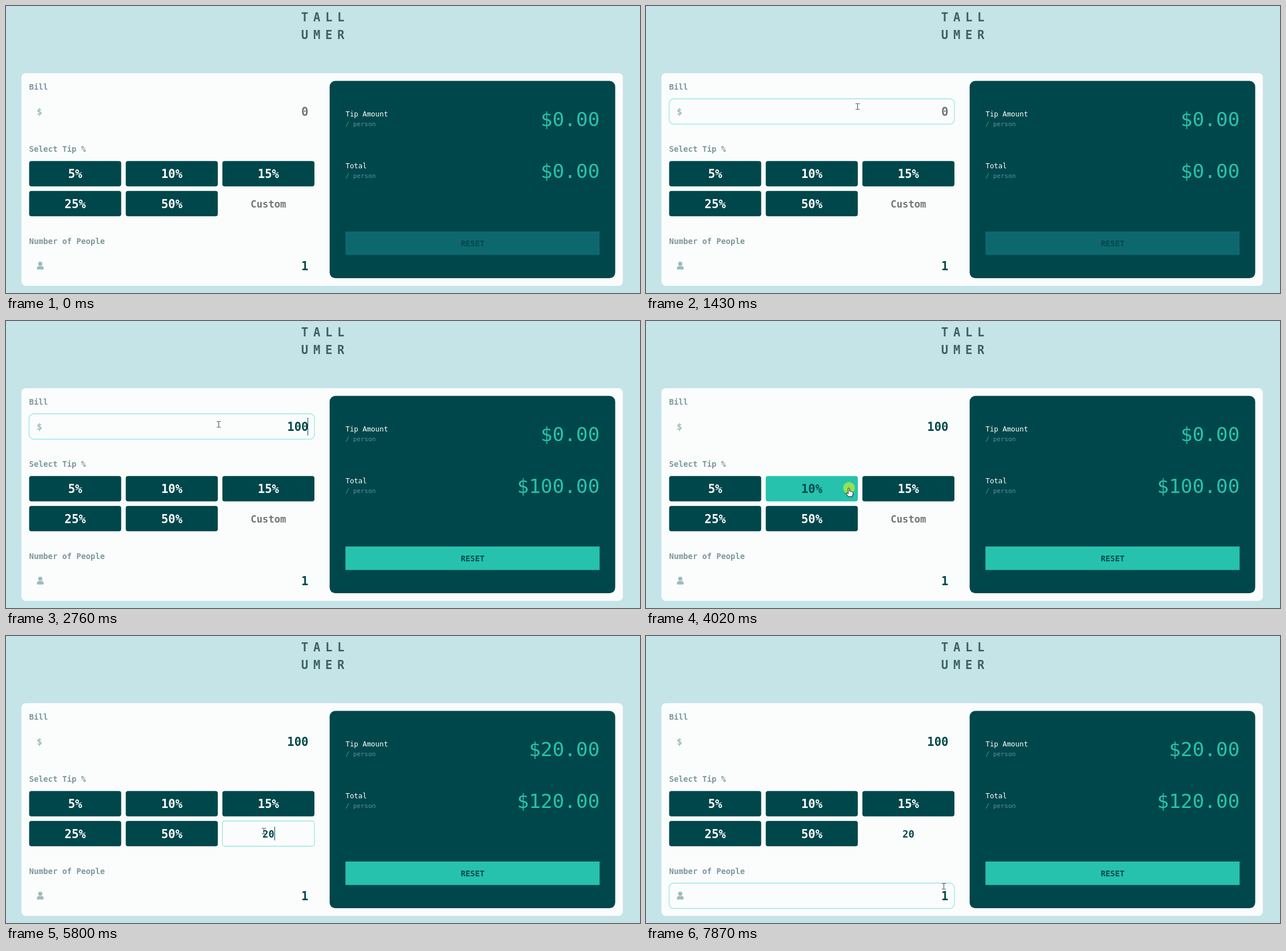
An HTML page with a canvas for the animation above (8 s loop, 1110 px wide and 504 px high).

```html
<!DOCTYPE html>
<html lang="en">
<head>
<meta charset="utf-8">
<title>Tip calculator</title>
<style>
html, body { margin: 0; width: 100%; height: 100%; overflow: hidden; background: #c5e4e7; }
canvas { display: block; width: 1110px; height: 504px; }
</style>
</head>
<body>
<canvas id="stage" width="1110" height="504"></canvas>
<script>
const ctx = document.getElementById('stage').getContext('2d');
const LOOP = 8000, STEP = 65;
const MONO = '"DejaVu Sans Mono", "Liberation Mono", monospace';
const DARK = '#00474b', TEAL = '#26c2ad', PAPER = '#fbfdfd',
      LABEL = '#7c9799', ICON = '#9dbbbd', HINT = '#737577', RING = '#9fe8df';

// Two equal columns; the left one holds a grid three cells wide
const PAD = 13.5, LEFT = 27 + PAD, COL = 499.5, GAP = 8, ROW = 44.5;
const CELL = (COL - 2 * GAP) / 3;
const cell = i => ({
  x: LEFT + (i % 3) * (CELL + GAP),
  y: 272.2 + Math.floor(i / 3) * (ROW + GAP),
  w: CELL, h: ROW, r: 4
});
const field = y => ({ x: LEFT, y, w: COL, h: ROW, r: 8 });
const BILL = field(163), PEOPLE = field(434), CUSTOM = cell(5);
const BUTTONS = ['5%', '10%', '15%', '25%', '50%'].map((label, i) => ({ label, ...cell(i) }));
const TEN = BUTTONS[1];

// Each move follows a cubic curve and ends with a press on its target
const MOVES = [
  { from: 520, to: 1500, curve: [[1091, 42], [760, 170], [341, 58], [372, 181]], target: BILL },
  { from: 3355, to: 3950, curve: [[372, 181], [410, 215], [395, 265], [355.5, 293]], target: TEN },
  { from: 4215, to: 4810, curve: [[355.5, 293], [385, 335], [415, 320], [451.5, 341.5]], target: CUSTOM },
  { from: 6085, to: 6870, curve: [[451.5, 341.5], [480, 360], [490, 410], [521.5, 438.5]], target: PEOPLE }
];
const PRESS_DELAY = 60, PRESS_TIME = 140;
const BLINK = 500;

const clamp = (v, lo, hi) => Math.min(hi, Math.max(lo, v));
const ease = u => u * u * (3 - 2 * u);
const inside = (p, b) => p.x >= b.x && p.x <= b.x + b.w && p.y >= b.y && p.y <= b.y + b.h;
const money = v => '$' + v.toFixed(2);

function text(str, x, y, size, color, align = 'left', weight = 'bold') {
  ctx.font = `${weight} ${size}px ${MONO}`;
  ctx.textAlign = align;
  ctx.fillStyle = color;
  ctx.fillText(str, x, y);
}

function box({ x, y, w, h, r }, fill, stroke) {
  ctx.beginPath();
  ctx.roundRect(x, y, w, h, r);
  if (fill) { ctx.fillStyle = fill; ctx.fill(); }
  if (stroke) { ctx.strokeStyle = stroke; ctx.lineWidth = 1.4; ctx.stroke(); }
}

function disc(x, y, r, color) {
  ctx.beginPath();
  ctx.arc(x, y, r, 0, Math.PI * 2);
  ctx.fillStyle = color;
  ctx.fill();
}

function pointerAt(t) {
  const move = MOVES.findLast(m => t >= m.from);
  if (!move) return null;
  const { from, to, curve: [a, b, c, d] } = move;
  const q = Math.floor((t - from) / STEP) * STEP;
  const u = ease(clamp(q / (to - from), 0, 1)), v = 1 - u;
  const at = k => v ** 3 * a[k] + 3 * v * v * u * b[k] + 3 * v * u * u * c[k] + u ** 3 * d[k];
  return { x: at(0), y: at(1) };
}

function typed(str, t, start, gap) {
  const n = clamp(Math.floor((t - start) / gap) + 1, 0, str.length);
  return { value: str.slice(0, n), last: n ? start + gap * (n - 1) : 0 };
}

function stateAt(t) {
  const bill = typed('100', t, 2230, 265);
  const custom = typed('20', t, 5475, 325);
  const move = MOVES.findLast(m => t >= m.to + PRESS_DELAY);
  const pressed = move ? move.to + PRESS_DELAY : 0;
  const pressing = move && t < pressed + PRESS_TIME;
  const chosen = move && !custom.value && (move.target === TEN || move.target === CUSTOM);
  const rate = custom.value || (chosen && !(move.target === TEN && pressing) ? 10 : 0);
  const tip = bill.value * rate / 100;
  const idle = t - Math.max(pressed, bill.last, custom.last);
  return {
    bill: bill.value, custom: custom.value, tip, total: +bill.value + tip,
    focus: move && move.target, caret: idle % (2 * BLINK) < BLINK, pressing,
    tenLevel: chosen ? 1 : custom.value ? clamp(1 - (t - 5475) / 130, 0, 1) : 0
  };
}

function blend(k) {
  const mix = (a, b) => Math.round(a + (b - a) * k);
  return `rgb(${mix(0, 38)},${mix(71, 194)},${mix(75, 173)})`;
}

function person() {
  disc(60, 452.6, 3.7, ICON);
  ctx.beginPath();
  ctx.roundRect(54.2, 456.8, 11.6, 6, [3.5, 3.5, 1.3, 1.3]);
  ctx.fill();
}

function outline(x, y, d) {
  ctx.save();
  ctx.translate(x, y);
  const p = new Path2D(d);
  ctx.fillStyle = '#fff';
  ctx.strokeStyle = '#111';
  ctx.lineWidth = 1;
  ctx.lineJoin = 'round';
  ctx.fill(p);
  ctx.stroke(p);
  ctx.restore();
}

function beam(p) {
  const x = Math.round(p.x - 0.5), y = Math.round(p.y);
  ctx.fillStyle = '#3b4245';
  ctx.fillRect(x, y - 5, 1, 11);
  for (const dy of [-5, 5]) {
    ctx.fillRect(x - 3, y + dy, 2.5, 1);
    ctx.fillRect(x + 1.5, y + dy, 2.5, 1);
  }
}

function pointer(p) {
  if ([BILL, PEOPLE, CUSTOM].some(b => inside(p, b))) beam(p);
  else if (BUTTONS.some(b => inside(p, b)))
    outline(p.x, p.y, 'M-1.5 1Q0 -1 1 1V6Q2.5 5 3.3 6.5Q5 6 5.4 7.3Q7 7 7 8.6V11L5.5 15.5H-1.5L-5 10.2Q-5 8.5 -3.3 9L-1.5 10.5Z');
  else outline(p.x + 0.5, p.y + 0.5, 'M0 0V11.2L2.6 8.9L4.4 12.8L6.2 12L4.5 8.2H8Z');
}

function caret(s) {
  ctx.fillStyle = DARK;
  if (s.focus === BILL) ctx.fillRect(528, 170, 1, 31);
  if (s.focus === PEOPLE) ctx.fillRect(516, 441, 1, 31);
  if (s.focus === CUSTOM) ctx.fillRect(460 + Math.round(s.custom.length * 5.2), 335, 1, 24);
}

function result(name, amount, y) {
  text(name, 594.5, y - 17, 12.35, '#fff', 'left', 'normal');
  text('/ person', 594.5, y, 11, '#5b9195', 'left', 'normal');
  text(money(amount), 1039.3, y, 34.3, TEAL, 'right', 'normal');
}

function draw(t) {
  const s = stateAt(t), p = pointerAt(t);
  const hover = b => p && inside(p, b);

  ctx.fillStyle = '#c5e4e7';
  ctx.fillRect(0, 0, 1110, 504);
  ['TALL', 'UMER'].forEach((row, j) => [...row].forEach((ch, i) =>
    text(ch, 523 + i * 21.1, 27 + j * 31, 20.6, '#3d6265', 'center')));
  box({ x: 27, y: 118, w: 1053, h: 373.5, r: 8 }, PAPER);
  box({ x: 566.6, y: 131.6, w: 500, h: 346.5, r: 10 }, DARK);

  text('Bill', LEFT, 147, 13.75, LABEL);
  text('Select Tip %', LEFT, 256, 13.75, LABEL);
  text('Number of People', LEFT, 418, 13.75, LABEL);

  for (const b of [BILL, CUSTOM, PEOPLE])
    if (s.focus === b || hover(b)) box(b, null, RING);
  text('$', 53.8, 191, 16, ICON);
  text(s.bill || '0', 529.5, 193, 20.6, s.bill ? DARK : HINT, 'right');
  person();
  text('1', 529.5, 464, 20.6, DARK, 'right');

  for (const b of BUTTONS) {
    const k = hover(b) ? 1 : b === TEN ? s.tenLevel : 0;
    box(b, blend(k));
    text(b.label, b.x + b.w / 2, b.y + 30, 20.6, k > 0.5 ? DARK : '#fff', 'center');
  }
  text(s.custom || 'Custom', CUSTOM.x + CELL / 2, 353.5, 17.2, s.custom ? DARK : HINT, 'center');

  result('Tip Amount', s.tip, 211);
  result('Total', s.total, 302);
  box({ x: 594.3, y: 396, w: 445, h: 41.3, r: 0 }, s.bill ? TEAL : '#0d686d');
  text('RESET', 817, 422, 13.75, DARK, 'center');

  if (s.caret) caret(s);
  if (s.pressing) disc(p.x, p.y, 10.3, 'rgba(255,255,0,.5)');
  if (p) pointer(p);
}

const start = performance.now();
function frame() {
  draw((performance.now() - start) % LOOP);
  requestAnimationFrame(frame);
}
frame();
</script>
</body>
</html>
```
